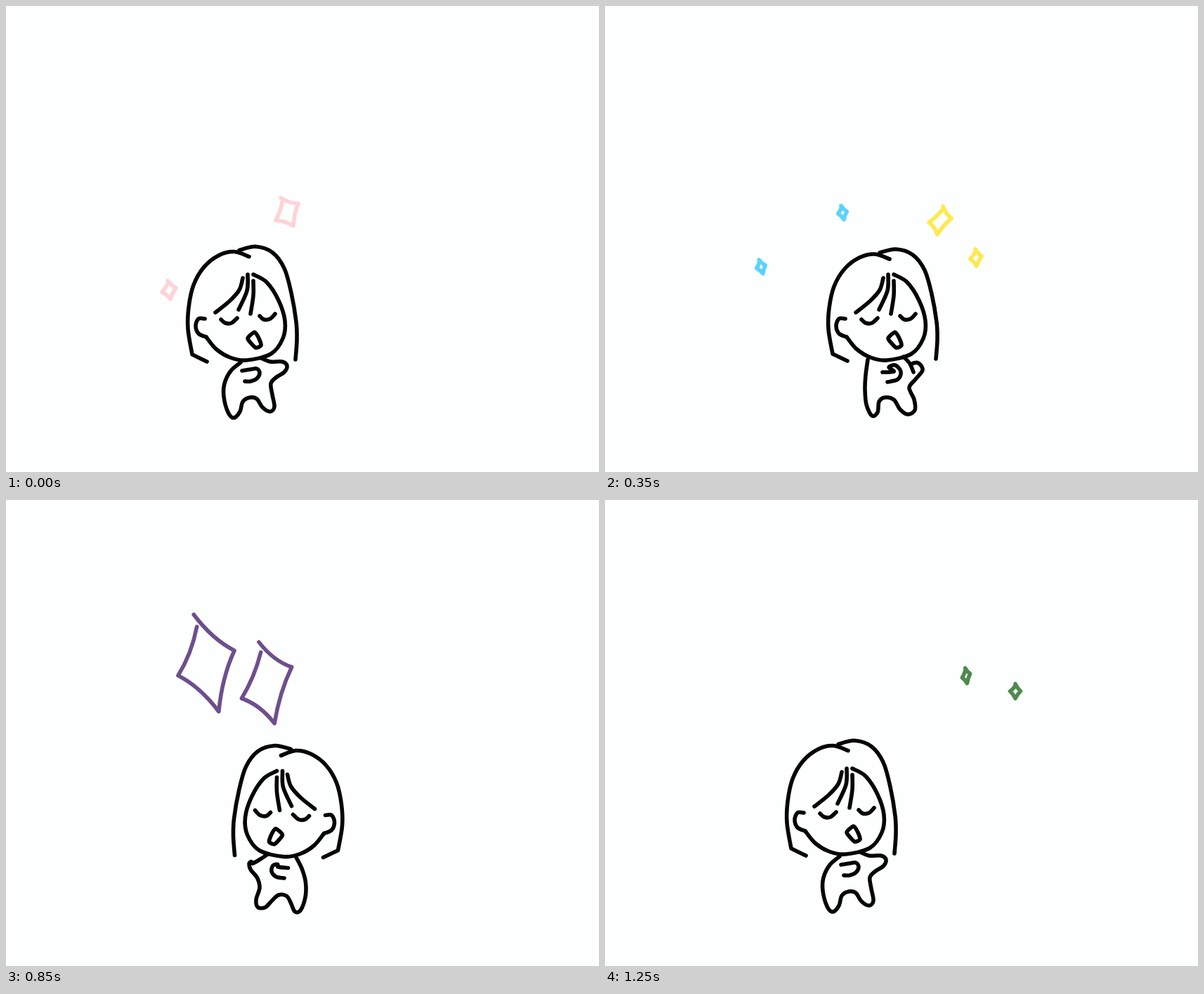
These frames come from a looping animation (844 px wide and 663 px high, 1300 ms). An HTML page with a canvas:

```html
<!DOCTYPE html>
<html lang="en">
<head>
<meta charset="utf-8">
<title>Sparkle dance</title>
<style>
html, body { margin: 0; width: 100%; height: 100%; overflow: hidden; background: #fdfefe; }
canvas { display: block; }
</style>
</head>
<body>
<canvas id="stage" width="844" height="663"></canvas>
<script>
const ctx = document.getElementById('stage').getContext('2d');
const LOOP = 1300, STEP = 50, NECK = 470;

const mix = (a, b, u) => a + (b - a) * u;
const mixAll = (a, b, u) => a.map((v, i) => mix(v, b[i], u));
const points = text => text.split(',').map(p => p.trim().split(' ').map(Number));

// The girl faces right, x counts from the middle of her face; a doubled point is a corner.
const hair = [
  '-8 351,15 346,39 354,56 376,66 410,73 450,74 475,72 502',
  '6 360,-15 353,-37 358,-58 374,-73 399,-80 430,-81 460,-75 495,-75 495,-54 505'
].map(points);
const face = [
  '12 382,31 393,48 419,57 448,54 473,37 495,2 504,-21 500,-41 488,-55 471',
  '-57 445,-66 445,-70 455,-66 466,-55 471',
  '-3 387,-8 404,-22 420,-42 436',
  '4 382,3 405,-9 432',
  '12 391,12 412,8 438',
  '-34 446,-28 451,-19 451,-11 444',
  '21 441,27 446,36 445,43 438'
].map(points);
const mouth = points('4 473,14 464,20 473,23 483,15 486');

// Each has an open and a folded arm.
const body = {
  open: points(`-6 507,-20 519,-29 537,-30 556,-24 578,-16 586,-7 577,-3 563,7 557,17 559,25 571,
    36 577,42 570,39 553,37 537,45 528,56 521,60 512,53 506,36 506,23 501`),
  folded: points(`-25 503,-28 525,-29 545,-27 567,-19 583,-11 578,-9 563,-1 557,12 560,21 574,32 581,
    42 575,41 560,34 543,43 531,53 518,47 508,37 510,40 521,35 509,26 499`)
};
const hand = {
  open: points('-4 519,8 517,17 516,21 522,17 530,8 534,0 534'),
  folded: points('-4 521,12 520,5 514,14 511,22 520,18 531,3 535')
};

// time, x, y, arm fold, head stretch
const dance = [
  [0, 340, 0, 0, 1.03], [150, 351, 0, 0, 1], [350, 399, 0, 1, 1], [550, 417, 1, 1, 1],
  [750, 415, 1, 0, 1], [950, 380, 6, 1, 1], [1250, 340, 0, 0, 1.03], [LOOP, 340, 0, 0, 1.03]
];
const TURN = 450, TURN_BACK = 1150;

// Smooth curve through the points
function curve(pts, closed) {
  const n = pts.length, soft = closed ? 10 : 6;
  const at = i => closed ? pts[(i + n) % n] : pts[Math.max(0, Math.min(n - 1, i))];
  ctx.beginPath();
  ctx.moveTo(...pts[0]);
  for (let i = 0; i < (closed ? n : n - 1); i++) {
    const [p, q, r, s] = [at(i - 1), at(i), at(i + 1), at(i + 2)];
    if (q[0] === r[0] && q[1] === r[1]) continue;
    ctx.bezierCurveTo(
      q[0] + (r[0] - p[0]) / soft, q[1] + (r[1] - p[1]) / soft,
      r[0] - (s[0] - q[0]) / soft, r[1] - (s[1] - q[1]) / soft, ...r);
  }
  if (closed) ctx.closePath();
  ctx.stroke();
}

function drawGirl(t) {
  const next = dance.findIndex(key => key[0] > t);
  const [a, b] = [dance[next - 1], dance[next]];
  const [, x, y, fold, tall] = mixAll(a, b, (t - a[0]) / (b[0] - a[0]));
  const stretch = pts => pts.map(([px, py]) => [px, NECK + (py - NECK) * tall]);
  const arm = part => part.open.map((p, i) => mixAll(p, part.folded[i], fold));

  ctx.save();
  ctx.translate(x, y);
  if (t >= TURN && t < TURN_BACK) ctx.scale(-1, 1);
  ctx.strokeStyle = '#050505';
  hair.forEach(line => curve(stretch(line)));
  face.forEach(line => curve(line));
  curve(mouth, true);
  curve(arm(body));
  curve(arm(hand));
  ctx.restore();
}

// Sizes go from one to the other between `from` and `to`, with a swell in between.
// Star: x, y, vector to the tip, vector to the right corner.
const sparkles = [
  { color: '#ffd3d5', start: 0, from: 0, to: 150, end: 200, sizes: [1, .14], swell: 0,
    stars: [[400, 293, -9, -20, 16, -12], [232, 404, -2, -13, 10, -3]] },
  { color: '#ffe94e', start: 100, from: 150, to: 350, end: 480, sizes: [.53, 1], swell: .6,
    stars: [[477, 305, 4, -20, 16, -3]] },
  { color: '#ffe94e', start: 200, from: 250, to: 350, end: 480, sizes: [.7, 1], swell: .6,
    stars: [[528, 358, -1, -12, 8, -2]] },
  { color: '#5bd2fd', start: 300, from: 350, to: 550, end: 650, sizes: [.7, 1], swell: 1.7,
    stars: [[338, 294, -3, -14, 9, -2], [222, 371, -4, -14, 9, -3]] },
  { color: '#a83577', start: 500, from: 550, to: 750, end: 850, sizes: [1, 1], swell: .8,
    stars: [[464, 240, -1, -20, 12, -2], [514, 325, -3, -22, 13, -2], [566, 341, -6, -26, 14, -5]] },
  { color: '#6d4f8c', start: 700, from: 750, to: 950, end: 1050, sizes: [.85, 1], swell: 1.3,
    stars: [[285, 232, -8, -31, 18, -8], [371, 260, -5, -26, 16, -10]] },
  { color: '#4e8a4e', start: 900, from: 950, to: 1250, end: LOOP, sizes: [1, .47], swell: 1,
    stars: [[514, 250, -3, -23, 12, -6], [584, 272, 0, -22, 16, 0]] }
];

function sparkleSize({ start, from, to, end, sizes: [a, b], swell }, t) {
  if (t < from) return a * (t - start) / (from - start);
  if (t > to) return b * (end - t) / (end - to);
  const u = (t - from) / (to - from);
  return mix(a, b, u) + swell * Math.sin(Math.PI * u);
}

function drawStar([x, y, tipX, tipY, sideX, sideY], size) {
  const corner = (tip, side) =>
    [x + size * (tip * tipX + side * sideX), y + size * (tip * tipY + side * sideY)];
  const pts = [corner(1, 0), corner(0, 1), corner(-1, 0), corner(0, -1), corner(.75, 0)];
  ctx.beginPath();
  ctx.moveTo(...pts[0]);
  for (let i = 1; i < pts.length; i++) {
    const half = mixAll(pts[i - 1], pts[i], .5);
    ctx.quadraticCurveTo(...mixAll(half, [x, y], .22), ...pts[i]);
  }
  ctx.stroke();
}

function draw(now) {
  const t = Math.floor(now % LOOP / STEP) * STEP;
  ctx.fillStyle = '#fdfefe';
  ctx.fillRect(0, 0, 844, 663);
  ctx.lineCap = ctx.lineJoin = 'round';
  ctx.lineWidth = 5.6;
  for (const group of sparkles) {
    if (t < group.start || t >= group.end) continue;
    ctx.strokeStyle = group.color;
    group.stars.forEach(star => drawStar(star, sparkleSize(group, t)));
  }
  drawGirl(t);
}

const begin = performance.now();
function tick() {
  draw(performance.now() - begin);
  requestAnimationFrame(tick);
}
tick();
</script>
</body>
</html>
```
